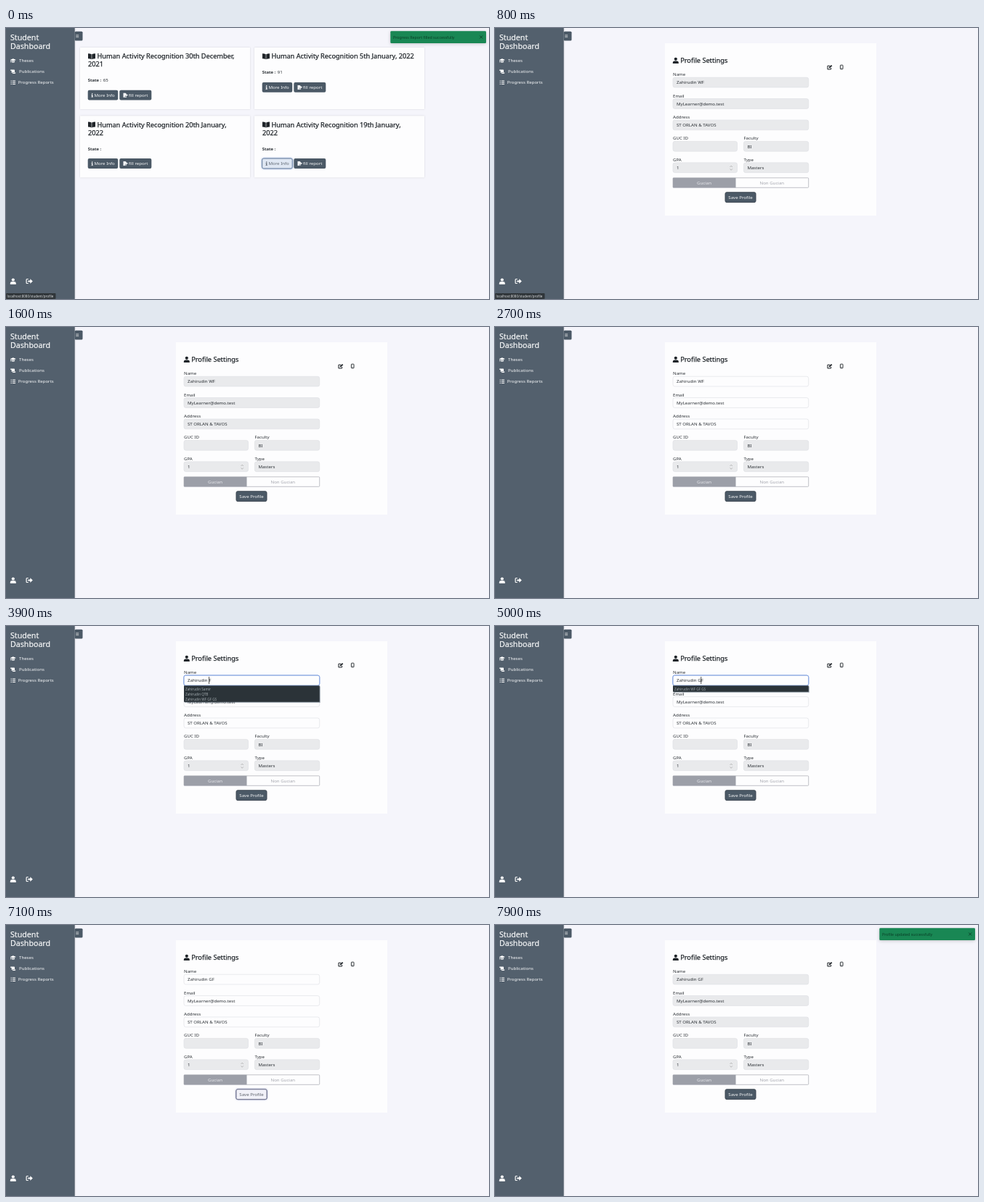
These frames come from a looping animation (665 by 374 pixels, 8000 ms). An HTML page:

```html
<!DOCTYPE html>
<html lang="en">
<head>
<meta charset="utf-8">
<title>Student Dashboard</title>
<style>
  html, body { margin: 0; width: 100%; height: 100%; overflow: hidden; background: #f5f5fb; }
  svg { display: block; width: 100%; height: 100%; font: 6.1px "Noto Sans", "Open Sans", sans-serif; }
  .head { font-size: 9.2px; fill: #1f2429; stroke: #1f2429; stroke-width: .25; }
  .brand { font-size: 10.65px; stroke: #f7f8f9; stroke-width: .2; }
  .mid { text-anchor: middle; }
  .card { filter: drop-shadow(0 .3px .8px #0002); }
  .field { stroke: #dcdee2; stroke-width: .6; }
  .line { fill: none; stroke: currentColor; }
</style>
</head>
<body>
<svg id="stage" viewBox="0 0 665 374"></svg>
<script>
const LOOP = 8000;
const DARK = '#4b5966', INK = '#2a2f34', OFF = '#e9eaec', PAPER = '#fdfdfe';
const OLD_NAME = 'Zahirudin WF', CUT_NAME = 'Zahirudin F', NEW_NAME = 'Zahirudin GF';
const HINTS = ['Zahirudin Samir', 'Zahirudin QTB', 'Zahirudin WF GF GS'];

const text = (x, y, s, attrs = '') =>
  `<text x="${x}" y="${y}" ${attrs.includes('fill=') ? '' : `fill="${INK}"`} ${attrs}>${s}</text>`;
const head = (x, y, s) => `<text class="head" x="${x}" y="${y}">${s}</text>`;
const rect = (x, y, w, h, fill, attrs = '') =>
  `<rect x="${x}" y="${y}" width="${w}" height="${h}" fill="${fill}" ${attrs}/>`;
const group = (id, body) => `<g id="${id}">${body}</g>`;

// Icons are drawn around their own centre.
const shapes = {
  user: '<circle cy="-2" r="2.1"/><path d="M-4 4.2V3Q-4 .6 -1.5 .6H1.5Q4 .6 4 3V4.2Z"/>',
  exit: '<path d="M-1.5 -3H-3.5Q-4.2 -3 -4.2 -2V2Q-4.2 3 -3.5 3H-1.5" class="line" stroke-width="1.2"/><path d="M-2 -1H1V-3.2L4.5 0L1 3.2V1H-2Z"/>',
  cap: '<path d="M-4 -1L0 -2.8L4 -1L0 .8ZM-2.3 .5L0 1.5L2.3 .5V2.1Q0 3.2 -2.3 2.1ZM-3.6 -.6V2.5H-3V-.6Z"/>',
  scroll: '<path d="M-3.6 -2.7H1.4Q2.2 -2.7 2.2 -1.7V.9H-1V2H-1.4Q-2.2 2 -2.2 1V-1H-3.6ZM-.5 1.4H3.6Q3.6 2.8 2.3 2.8H-1.2Q-.5 2.5 -.5 1.4Z"/>',
  list: '<path d="M-3.2 -2.2H-2M-3.2 0H-2M-3.2 2.2H-2M-1 -2.2H3.2M-1 0H3.2M-1 2.2H3.2" class="line"/>',
  book: '<path d="M-.3 -2.9Q-2 -4 -5 -4V3Q-2 3 -.3 4ZM.3 -2.9Q2 -4 5 -4V3Q2 3 .3 4Z"/>',
  info: '<circle cy="-2" r=".8"/><path d="M-1.1 -.7H.7V1.9H1.2V2.8H-1.2V1.9H-.6V.2H-1.1Z"/>',
  edit: '<path d="M.6 -2H-2.7V2.8H2V.8" class="line"/><path d="M-1.1 1.4L-.8 -.2L2.4 -3.2L3.7 -1.9L.5 1.1Z"/>',
  form: '<path d="M-2.8 -3H.2L1.8 -1.4V-.6L-.6 1.6V2.4H1.8V3H-2.8Z"/><path d="M0 1.9L.2 .9L2.6 -1.3L3.6 -.3L1.2 1.8Z"/>',
  phone: '<rect x="-1.8" y="-2.8" width="3.6" height="5.6" rx=".6" class="line" stroke-width=".9"/><path d="M-.6 1.6H.6V2.3H-.6Z"/>'
};
const icon = (name, x, y, color) =>
  `<g transform="translate(${x} ${y})" fill="${color}" color="${color}">${shapes[name]}</g>`;

function sidebar() {
  const links = [['cap', 'Theses'], ['scroll', 'Publications'], ['list', 'Progress Reports']];
  const brand = 'class="brand" fill="#f7f8f9"';
  return rect(0, 0, 94.7, 374, '#53606d', 'style="filter:drop-shadow(0 0 1px #0003)"')
    + rect(94.7, 4.8, 10.8, 12.8, DARK, 'rx="1.5"')
    + '<path d="M96.2 9.7h4M96.2 11.2h4M96.2 12.7h4" stroke="#eee" stroke-width=".6"/>'
    + text(6, 16.8, 'Student', brand) + text(6, 29.2, 'Dashboard', brand)
    + links.map(([name, label], i) => icon(name, 9.8, 45 + 15.1 * i, '#fff')
        + text(i < 2 ? 18 : 16.7, 47.2 + 15.1 * i, label, 'fill="#f7f8f9"')).join('')
    + icon('user', 9.8, 349.5, '#fff') + icon('exit', 32.3, 349.5, '#fff');
}

function report(x, y, lines, state, lit) {
  const low = y + (lines.length - 1) * 10.8;
  const more = lit
    ? rect(x + 10.7, low + 48, 41.5, 13.8, '#dfe7f3', 'rx="2" stroke="#687f9c" style="filter:drop-shadow(0 0 1px #7898d0)"')
    : rect(x + 10.7, low + 48, 41.5, 13.8, DARK, 'rx="2"');
  const ink = lit ? '#626b76' : '#f7f8f9';
  return rect(x, y, 234, 85, PAPER, 'class="card"')
    + icon('book', x + 16, y + 12.2, '#1f2429')
    + lines.map((s, i) => head(x + (i ? 10.9 : 23.4), y + 15.4 + 10.8 * i, s)).join('')
    + text(x + 10.7, low + 36.4, 'State :', 'font-weight="700" font-size="5.9"')
    + text(x + 31.7, low + 36.4, state)
    + more + icon('info', x + 16.7, low + 54.9, ink) + text(x + 19.5, low + 57.2, 'More Info', `fill="${ink}"`)
    + rect(x + 54.3, low + 48, 44, 13.8, DARK, 'rx="2"')
    + icon('form', x + 62.3, low + 54.9, '#f7f8f9') + text(x + 67, low + 57.2, 'fill report', 'fill="#f7f8f9"');
}

function reports() {
  const title = 'Human Activity Recognition ';
  return report(102, 27, [title + '30th December,', '2021'], '65')
    + report(342, 27, [title + '5th January, 2022'], '91')
    + report(102, 121.3, [title + '20th January,', '2022'], '')
    + report(342, 121.3, [title + '19th January,', '2022'], '', true);
}

function field(x, row, w, label, value, cls = '', id = '') {
  const y = 68.2 + 29.4 * row;
  return text(x, y - 2, label)
    + rect(x, y, w, 13.8, OFF, `rx="2.6" class="field ${cls}"`)
    + text(x + 5, y + 9.2, value, id && `id="${id}"`);
}

function profile() {
  const save = (fill, stroke, ink, extra = '') =>
    rect(317, 226.8, 42, 13.8, fill, `rx="2" stroke="${stroke}" ${extra}`)
    + text(338, 235.9, 'Save Profile', `class="mid" fill="${ink}"`);
  return rect(234, 21, 291, 238, PAPER)
    + icon('user', 248.8, 44.8, '#1f2429') + head(255.2, 48, 'Profile Settings')
    + icon('edit', 460.6, 54.2, '#1f2429') + icon('phone', 477.2, 54, '#1f2429')
    + field(245, 0, 186.7, 'Name', OLD_NAME, 'open', 'name')
    + field(245, 1, 186.7, 'Email', 'MyLearner@demo.test', 'open')
    + field(245, 2, 186.7, 'Address', 'ST ORLAN &amp; TAVOS', 'open')
    + field(245, 3, 88.5, 'GUC ID', '') + field(342.4, 3, 89.3, 'Faculty', 'BI')
    + field(245, 4, 88.5, 'GPA', '1') + field(342.4, 4, 89.3, 'Type', 'Masters')
    + '<path d="M323.5 192l1.7-1.9 1.7 1.9M323.5 194.3l1.7 1.9 1.7-1.9" class="line" color="#999" stroke-width=".6"/>'
    + rect(245, 206.8, 186.7, 13.5, PAPER, 'rx="1" stroke="#a6a8b0" stroke-width=".7"')
    + rect(245, 206.8, 86.5, 13.5, '#9c9fa8')
    + text(288, 215.7, 'Gucian', 'class="mid" fill="#e9eaee"')
    + text(381.3, 215.7, 'Non Gucian', 'class="mid" fill="#a4a6ad"')
    + save(DARK, '#3c4651', '#f7f8f9')
    + group('hot', save('#f1f1f8', '#74778f', '#5b6069', 'style="filter:drop-shadow(0 0 1px #8a90c0)"'))
    + group('focus', rect(244.8, 68, 187, 14.2, 'none',
        'rx="2.7" stroke="#7d9fe0" stroke-width=".9" style="filter:drop-shadow(0 0 .5px #a5bdee)"'))
    + rect(0, 70, .7, 10, '#111', 'id="caret"')
    + group('hints', rect(245, 82.3, 186.7, 8.5, '#2b3338', 'id="hintBox" style="filter:drop-shadow(1.2px 1px .7px #5679)"')
      + HINTS.map((_, i) => text(247, 88.7 + 7 * i, '', 'class="hint" font-size="4.65" fill="#a3abb0"')).join(''));
}

const $ = id => document.getElementById(id);
const show = (id, alpha) => { $(id).style.opacity = +alpha; };
const ramp = (t, a, b) => Math.min(1, Math.max(0, (t - a) / (b - a)));
const within = (t, a, b) => t >= a && t < b;

$('stage').innerHTML = rect(0, 0, 665, 374, '#f5f5fb')
  + group('reports', reports()) + group('profile', profile()) + sidebar()
  + group('status', rect(0, 366, 68.5, 8, '#30363a', 'rx="1"')
    + text(1.5, 371.7, 'localhost:8080/student/profile', 'font-size="4.5" fill="#d5d8da"'))
  + group('toast', rect(529.3, 4.3, 131.7, 16.7, '#198754', 'rx="1.3" style="filter:drop-shadow(0 1.5px 2px #0003)"')
    + text(533, 14.5, '', 'id="message" font-size="5.3" fill="#0a3f27"')
    + '<path d="M652.2 10.5l4 4M656.2 10.5l-4 4" stroke="#0a3422" stroke-width=".8"/>');

const name = $('name'), caret = $('caret');
const openFields = document.querySelectorAll('.open'), hintRows = document.querySelectorAll('.hint');

function setText(node, s) {
  if (node.textContent !== s) node.textContent = s;
}

function draw(ms) {
  const t = Math.floor(ms % LOOP / 100) * 100;
  show('reports', t < 100);
  show('profile', t >= 100);
  show('status', 1 - ramp(t, 1200, 1500));
  show('toast', t < 4000 ? 1 - ramp(t, 300, 700) : ramp(t, 7400, 7800));
  setText($('message'), t < 4000 ? 'Progress Report filled successfully' : 'Profile updated successfully');

  const editing = within(t, 2700, 7500);
  openFields.forEach(f => f.setAttribute('fill', editing ? PAPER : OFF));
  show('focus', ramp(t, 3100, 3300) - ramp(t, 5900, 6200));
  show('hot', ramp(t, 6300, 6500) - ramp(t, 7100, 7300));

  setText(name, t < 3800 ? OLD_NAME : t < 4700 ? CUT_NAME : NEW_NAME);
  const at = within(t, 3800, 4000) ? 10 : 11;
  caret.setAttribute('x', 249.8 + name.getSubStringLength(0, at));
  show('caret', within(t, 3200, 5800) && !within(t, 4400, 4700));

  const hints = within(t, 3800, 4900) ? HINTS : HINTS.slice(-1);
  show('hints', within(t, 3500, 6000));
  $('hintBox').setAttribute('height', 1.5 + 7 * hints.length);
  hintRows.forEach((row, i) => setText(row, hints[i] || ''));
}

const start = performance.now();
function tick() {
  draw(performance.now() - start);
  requestAnimationFrame(tick);
}
tick();
</script>
</body>
</html>
```
